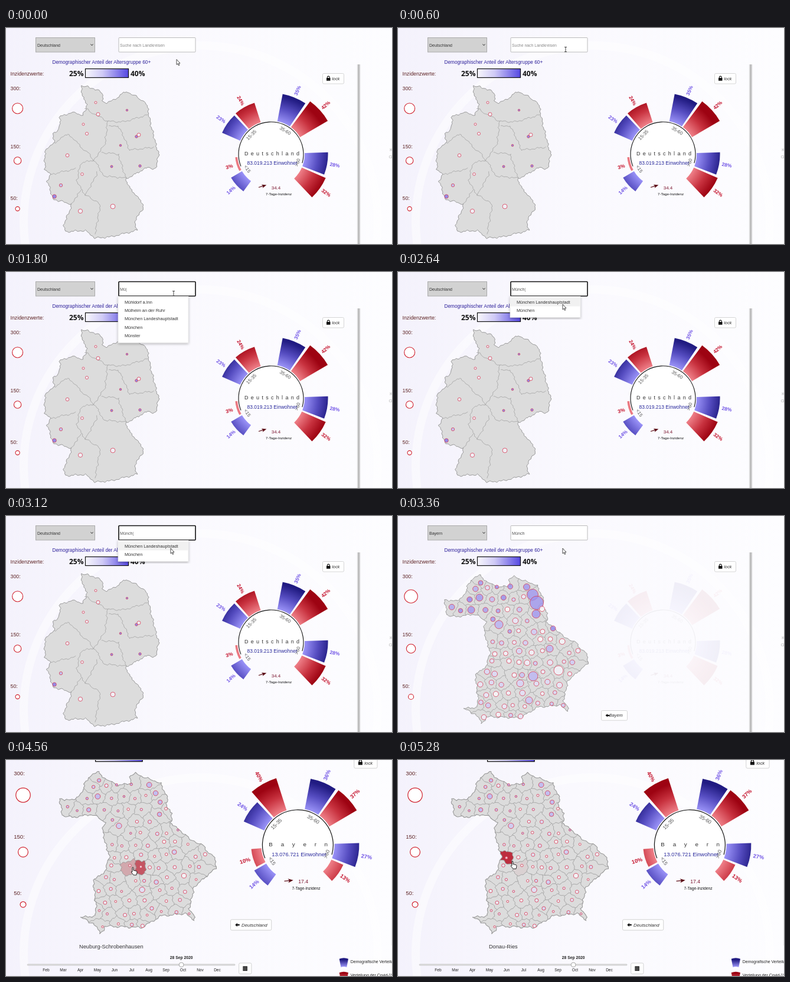
These frames come from a looping animation (654 by 368 pixels, 5400 ms). An HTML page:

```html
<!DOCTYPE html>
<html lang="de">
<head>
<meta charset="utf-8">
<style>
html, body { margin: 0; width: 100%; height: 100%; overflow: hidden; background: #fbfaff; }
svg { display: block; width: 100vw; height: 100vh; font-family: Arial, "Liberation Sans", sans-serif; }
</style>
</head>
<body>
<svg id="stage" viewBox="0 0 654 368"></svg>
<script>
const LOOP = 5400, STEP = 120, SWITCH = 3240, ZOOM = 3600;
const CX = 449, CY = 215, RING = 55;

const points = s => s.trim().split(/\s+/).map(p => p.split(',').map(Number));
const clamp = v => Math.max(0, Math.min(1, v));
const hash = i => { const v = Math.sin(i * 127.1 + 3) * 43758.5; return v - Math.floor(v); };
const text = (x, y, s, size, fill = '#333', extra = '') =>
  `<text x="${x}" y="${y}" font-size="${size}" fill="${fill}" ${extra}>${s}</text>`;
const rect = (x, y, w, h, fill, stroke = 'none', extra = '') =>
  `<rect x="${x}" y="${y}" width="${w}" height="${h}" fill="${fill}" stroke="${stroke}" ${extra}/>`;
const path = (d, fill = 'none', stroke = 'none', extra = '') =>
  `<path d="${d}" fill="${fill}" stroke="${stroke}" ${extra}/>`;
const button = (x, y, w, h) => rect(x, y, w, h, '#fff', '#ccc', 'rx="2" stroke-width=".8"');
const MID = 'text-anchor="middle"', ITALIC = 'font-style="italic"', BOLD = ' font-weight="bold"';

// ---- maps ----
const germany = points(`127,98 147,103 164,110 163,124 172,128 205,108 238,128 244,158 250,182 259,218 253,240
  241,238 203,256 208,270 234,302 218,330 222,344 178,356 152,358 133,345 100,347 98,335 112,300 80,292 70,262
  75,250 66,240 66,210 82,195 80,180 92,168 91,152 112,144 131,148 138,130 131,120`);
const stateBorders = ['133,137 172,159 198,160 240,148', '172,159 168,196 150,225', '176,168 190,166 210,208 252,203',
  '162,212 190,215 203,256 165,252 150,225', '82,196 105,180 150,225 126,230 120,262 135,285 155,246',
  '75,250 118,240', '112,300 127,275', '135,285 160,300 151,351'].map(points);
// x, y, radius
const cities = points(`152,127,2 156,147,3 205,140,1.7 131,164,2 137,180,2.5 221,185,2.3 225,182,3 194,200,1.8
  104,217,2.8 129,249,2.3 179,236,2 227,235,2.2 93,268,2.7 82,287,3.3 126,312,3.6 181,304,4`);
const bavaria = points(`79,143 100,145 118,128 116,120 130,104 139,101 152,113 170,122 190,118 189,108 196,103
  235,118 247,143 244,155 254,165 251,180 281,205 304,218 322,240 321,252 288,280 280,316 288,322 287,333 274,322
  235,326 208,344 150,342 142,353 132,338 110,328 134,326 136,316 131,270 148,258 156,235 145,190 150,180 130,167
  98,172 83,168`);
// x, y, first radius
const largest = points(`140,114,4 228,134,9.5 235,148,11.5 218,121,5.5 234,167,7 171,185,7 272,263,8 229,273,8
  257,226,6 207,285,6 124,160,6 138,139,6 222,314,6`);
// site x, y, enter, leave, name
const hovers = [
  [197, 271, 3200, 4000, 'Dachau'], [205, 249, 4000, 4450, 'Pfaffenhofen a.d.Ilm'],
  [188, 247, 4450, 4900, 'Neuburg-Schrobenhausen'], [164, 235, 4900, 9999, 'Donau-Ries']];

const inside = (x, y) => bavaria.reduce((odd, [ax, ay], i) => {
  const [bx, by] = bavaria[(i + 1) % bavaria.length];
  return (ay > y) !== (by > y) && x < ax + (bx - ax) * (y - ay) / (by - ay) ? !odd : odd;
}, false);

const sites = [...largest.map(([x, y, r], i) => [x, y, r, 2.4 + hash(i) * 2, y < 170 ? .6 : hash(i + 9) * .45]),
  ...hovers.map(([x, y]) => [x, y, 4, 2, .05])];
for (let row = 0; row < 14; row++) for (let col = 0; col < 14; col++) {
  const n = row * 14 + col;
  const x = 72 + col * 20 + row % 2 * 10 + hash(n) * 10, y = 101 + row * 18 + hash(n + 300) * 8;
  if (inside(x, y) && sites.every(s => Math.hypot(s[0] - x, s[1] - y) > 12))
    sites.push([x, y, 3 + hash(n + 500) * 2, 1.6 + hash(n + 700) * 1.2, hash(n + 900) * (y < 200 ? .7 : .35)]);
}

// Subdivides a line and bends it with position-based waves, so shared borders still meet.
function rough(line, closed) {
  const out = [], n = line.length;
  for (let i = 0; i < (closed ? n : n - 1); i++) {
    const [ax, ay] = line[i], [bx, by] = line[(i + 1) % n];
    const parts = Math.ceil(Math.hypot(bx - ax, by - ay) / 2.5);
    for (let k = 0; k <= parts; k++) {
      const x = ax + (bx - ax) * k / parts, y = ay + (by - ay) * k / parts;
      out.push((x + Math.sin(y * .8 + x * .3) * .9 + Math.sin(y * .33)).toFixed(1) + ' ' +
               (y + Math.sin(x * .75 - y * .35) * .9 + Math.sin(x * .31)).toFixed(1));
    }
  }
  return 'M' + out.join('L') + (closed ? 'Z' : '');
}

// Keeps the part of a polygon that is nearer to a than to b.
function cut(poly, a, b) {
  const side = p => (p[0] - (a[0] + b[0]) / 2) * (b[0] - a[0]) + (p[1] - (a[1] + b[1]) / 2) * (b[1] - a[1]);
  return poly.flatMap((p, i) => {
    const q = poly[(i + 1) % poly.length], sp = side(p), sq = side(q), out = sp <= 0 ? [p] : [];
    if (sp * sq < 0) out.push([0, 1].map(k => p[k] + (q[k] - p[k]) * sp / (sp - sq)));
    return out;
  });
}
const frame = [[60, 80], [340, 80], [340, 370], [60, 370]];
const cells = sites.map(a => rough(sites.reduce((poly, b) => b === a ? poly : cut(poly, a, b), frame), true));

const dot = (x, y, r, s) => `<circle cx="${x}" cy="${y}" r="${r}" fill="rgb(${255 - 165 * s},${255 - 180 * s},${255 - 25 * s})"
  fill-opacity=".75" stroke="#d8405a" stroke-width=".8"/>`;
const bavariaOutline = rough(bavaria, true);
const germanyMap = path(rough(germany, true), '#dcdcdc', '#999') +
  stateBorders.map(b => path(rough(b), 'none', '#a2a2a2', 'stroke-width=".8"')).join('') +
  cities.map(([x, y, r]) => dot(x, y, r, x > 175 && r < 2.5 || x < 85 ? .8 : x < 95 ? .4 : .05)).join('');
const districts = cells.map(d => path(d, '#dcdcdc', '#a2a2a2', 'stroke-width=".7"')).join('');

function bavariaMap(t) {
  const late = t >= ZOOM;
  const red = late ? hovers.map(([, , on, off], i) => {
    const alpha = clamp(Math.min((t - on) / 400, 1 - (t - off) / 400));
    return path(cells[largest.length + i], '#bb2335', '#999', `opacity="${alpha}" stroke-width=".7"`);
  }).join('') : '';
  return `<g clip-path="url(#land)">${districts}${red}</g>` + path(bavariaOutline, 'none', '#999') +
    sites.map(([x, y, early, small, s]) => dot(x, y, late ? small : early, late ? s * .7 : s)).join('');
}

// ---- ring chart ----
const polar = (r, deg) => {
  const a = deg * Math.PI / 180;
  return [CX + r * Math.cos(a), CY + r * Math.sin(a)].map(v => v.toFixed(2));
};
const arc = (r, a, b, sweep) => `A${r} ${r} 0 ${Math.abs(b - a) > 180 ? 1 : 0} ${sweep} ${polar(r, b)}`;
const wedge = (r, a, b) => `M${polar(RING + 2, a)}L${polar(r, a)}${arc(r, a, b, 1)}L${polar(RING + 2, b)}${arc(RING + 2, b, a, 0)}Z`;
const radial = (s, r, a, size, fill, turn, extra = '') =>
  `<g transform="translate(${polar(r, a)}) rotate(${turn})">${text(0, size * .36, s, size, fill, MID + extra)}</g>`;

function chart({ name, gap, people, rate, tilt, share }, opacity) {
  let s = path(`M${polar(RING, 158)}${arc(RING, 158, 376, 1)}`, '#fff', '#111', 'stroke-width="1.1"');
  share.forEach((p, i) => {
    const a = 126.5 + 77.2 * (i >> 1) + 25.5 * (i % 2), mid = a + 11.5, r = Math.sqrt(RING * RING + 225 * p);
    s += path(wedge(r, a, a + 23), i % 2 ? 'url(#red)' : 'url(#blue)');
    s += radial(p + '%', r + 13, mid, 8.5, i % 2 ? '#c4122c' : '#7256e6', i < 4 ? mid - 180 : mid, BOLD);
  });
  ['&lt;15', '15-35', '35-60', '&gt;60'].forEach((label, i) => {
    const a = 148 + 76.5 * i;
    s += radial(label, 47, a, 8, '#555', i % 3 ? a + 90 : a - 90);
  });
  s += text(404, 217, name, 9, '#333', `letter-spacing="${gap}"`) + text(451, 232.5, people + ' Einwohner', 8.5, '#28289c', MID);
  s += `<g transform="translate(428 271.5) rotate(${tilt})">${path('M0 0H9', 'none', '#5a0a14', 'stroke-width="1.2"')}${path('M6 -3.2L14 0 6 3.2 8 0Z', '#5a0a14')}</g>`;
  s += text(457.5, 275, rate, 8, '#7c1730', MID) + text(462, 285, '7-Tage-Inzidenz', 6.2, '#111', MID);
  return `<g opacity="${opacity}">${s}</g>`;
}
const country = { name: 'Deutschland', gap: 4.3, people: '83.019.213', rate: '34.4', tilt: -17, share: [14, 3, 23, 24, 35, 42, 28, 32] };
const region = { name: 'Bayern', gap: 12.6, people: '13.076.721', rate: '17.4', tilt: -6, share: [14, 10, 24, 40, 36, 37, 27, 13] };

// ---- search ----
const both = ['München Landeshauptstadt', 'München'];
const all = ['Altmarkkreis Salzwedel', 'Alzey-Worms', 'Amberg', 'Amberg-Sulzbach', 'Ammerland', 'Bad Dürkheim', 'Bamberg',
  'Barnim', 'Berlin-Charlottenburg-Wilmersdorf', 'Berlin-Marzahn-Hellersdorf', 'Berlin-Mitte',
  'Berlin-Tempelhof-Schöneberg', 'Bochum', 'Bremen', 'Bremerhaven'];
const results = [all, ['Mühldorf a.Inn', 'Mülheim an der Ruhr', ...both, 'Münster'], [...both, 'Münster'], both, both];

function search(t) {
  const focus = t >= 720 && t < SWITCH;
  const count = t < 1200 ? 0 : t < 1680 ? 1 : Math.min(5, 2 + Math.floor((t - 1680) / 240));
  let s = rect(191, 16.5, 130, 24.5, '#fff', focus ? '#111' : '#bbb', `rx="1" stroke-width="${focus ? 1.6 : 1}"`);
  if (!count) return s + text(193, 31.5, 'Suche nach Landkreisen', 6.9, '#888');
  s += text(193, 31.5, 'Münch'.slice(0, count) + (focus ? '<tspan fill="#777">|</tspan>' : ''), 7.2, '#555');
  if (!focus) return s;
  const items = results[count - 1], long = items === all, w = long ? 169 : 119, h = long ? 222 : items.length * 14.45 + 7;
  s += rect(190, 41.5, w, h, '#fff', '#ddd', 'stroke-width=".6" filter="url(#shade)"');
  if (t >= 2520) s += rect(190.5, 44, w - 1, 14.5, '#f1f1f1');
  items.forEach((item, i) => s += text(201, 53.5 + 14.45 * i, item, 7.35));
  if (long) s += rect(350.5, 42, 8, 221, '#f2f2f2') + rect(351, 50, 7, 24, '#c1c1c1') +
    path('M352.5 47.5l2 -2.5 2 2.5zM352.5 258l2 2.5 2 -2.5z', '#666');
  return s;
}

// ---- page ----
function page(t) {
  const inRegion = t >= SWITCH, zoomed = t >= ZOOM;
  let s = rect(596, 62, 3.2, 310, '#aaa', 'none', 'filter="url(#soft)"') + text(650, 210, 'K', 8, '#bbb') + text(648.5, 222, 'G', 8, '#bbb');
  s += rect(50.5, 16.5, 100, 24.5, '#d2d2d2', '#aaa') + text(53, 31.5, inRegion ? 'Bayern' : 'Deutschland', 7) +
    path('M143.5 27.5l2 2.3 2 -2.3', 'none', '#222');
  s += text(78.5, 61, 'Demographischer Anteil der Altersgruppe 60+', 8.25, '#2c1f9a');
  for (const [x, label] of [[107, '25%'], [211, '40%']])
    s += text(x, 81.5, label, 12, '#111', 'font-family="Noto Sans, sans-serif"' + BOLD);
  s += rect(134.5, 69.5, 73, 15, 'url(#scale)', '#111', 'stroke-width="1.2"');
  s += text(7.5, 80.5, 'Inzidenzwerte:', 8.8, '#5e2424');
  [[106, 300, 137, 9], [205, 150, 226, 6.2], [293, 50, 308, 3.6]].forEach(([y, label, cy, r]) =>
    s += text(7.5, y, label + ':', 8.8, '#5e2424') + `<circle cx="${inRegion ? 22 : 19.6}" cy="${cy}"
      r="${inRegion ? r * 1.25 : r}" fill="#fff" stroke="#d0222e" stroke-width="1.1"/>`);
  s += button(536.5, 77.5, 36, 17.5) + rect(543, 85, 6.5, 4.8, '#111') +
    path('M544.4 85.5V84a1.9 1.9 0 0 1 3.8 0V85.5', 'none', '#111', 'stroke-width="1.1"') + text(552.5, 89, 'lock', 7.3, '#333', ITALIC);
  s += inRegion ? bavariaMap(t) : germanyMap;
  if (t < 3480) s += chart(country, t < SWITCH ? 1 : t < 3360 ? .4 : .05);
  else s += chart(region, zoomed ? 1 : .5);
  if (inRegion) s += button(344.5, 331.5, zoomed ? 63.5 : 44, 16.7) + path('M351.5 339.8l3.6-2.8v1.7h3.4v2.2h-3.4v1.7z', '#111') +
    text(zoomed ? 361.5 : 358, 342.3, zoomed ? 'Deutschland' : 'Bayern', 7.2, '#333', ITALIC);
  return s + search(t) + (zoomed ? footer(t) : '');
}

function footer(t) {
  let s = text(159, 376.8, hovers.find(h => t < h[3])[4], 8.5, '#333', MID);
  s += rect(28.5, 401.2, 323, 2, '#ddd', '#bbb', 'rx="1" stroke-width=".5"') +
    '<circle cx="268" cy="402.2" r="3.6" fill="#fff" stroke="#999" stroke-width=".8"/>' + text(268, 392.8, '28 Sep 2020', 6.2, '#222', MID + BOLD);
  'Feb Mar Apr May Jun Jul Aug Sep Oct Nov Dec'.split(' ').forEach((m, i) => s += text(57.8 + 26.6 * i, 412.8, m, 6, '#222', MID));
  s += button(357.5, 399.5, 19.5, 17) + rect(363.6, 404.5, 7, 7.2, '#222') +
    path('M364 407h6m-6 2.4h6', 'none', '#fff', 'stroke-width=".4"');
  [['blue', 392, 'Demografische Verteilung'], ['red', 413.5, 'Verteilung der Covid-19-Fälle']].forEach(([c, y, label]) =>
    s += path(`M513.5 ${y + 1}q7 -3 14 0l-2.5 13q-4.5 -2 -9 0z`, `url(#${c}Key)`) + text(531, y + 7.2, label, 6.4, '#222'));
  return s;
}

// ---- pointer: time, x, y ----
const track = [[0, 289, 53.5], [120, 289, 53.5], [600, 284, 36.5], [2160, 284, 36.5], [2520, 279, 55], [3599, 279, 55],
  [3600, 222, 203], [3720, 222, 203], [4080, 226, 188], [4560, 212, 182], [5280, 191, 171.5]];
function pointer(t) {
  const i = Math.max(1, track.findIndex(k => k[0] >= t)), a = track[i - 1], b = track[i], f = (t - a[0]) / (b[0] - a[0]);
  const [x, y] = [1, 2].map(k => a[k] + (b[k] - a[k]) * f);
  const shape = t >= ZOOM
    ? path('M2 1.2q1.2 -1 2 .3V6l5 1.2q1.2.4 1 2L9 14H4L.2 9q.2 -1.4 1.8 -.4Z', '#fff', '#111', 'stroke-width=".9"')
    : y < 41 ? path('M-2 -4H2M0 -4V4M-2 4H2', 'none', '#333', 'stroke-width=".9"')
    : path('M0 0V9L2 7.2 3.4 10.4 4.8 9.8 3.4 6.6H6Z', '#fff', '#222', 'stroke-width=".8"');
  return `<g transform="translate(${x} ${y})">${shape}</g>`;
}

// ---- defs and loop ----
const stops = list => list.map(([o, c]) => `<stop offset="${o}" stop-color="${c}"/>`).join('');
const ringFill = (id, a, b, c) =>
  `<radialGradient id="${id}" gradientUnits="userSpaceOnUse" cx="${CX}" cy="${CY}" r="108">${stops([[.5, a], [.74, b], [.93, c]])}</radialGradient>
   <linearGradient id="${id}Key" x2="0" y2="0" y1="1">${stops([[0, a], [.8, c]])}</linearGradient>`;
const defs = `<defs>
  ${ringFill('blue', '#a39cff', '#554cc0', '#211b82')}${ringFill('red', '#f48a92', '#c8323f', '#9d0312')}
  <linearGradient id="scale">${stops([[0, '#f8f7fc'], [.4, '#cfcaf6'], [1, '#5548e2']])}</linearGradient>
  <linearGradient id="back">${stops([[0, '#f4f2fc'], [.45, '#faf9fe'], [1, '#fdfdff']])}</linearGradient>
  <clipPath id="land"><path d="${bavariaOutline}"/></clipPath>
  <filter id="soft" x="-200%" width="500%"><feGaussianBlur stdDeviation=".9 .4"/></filter>
  <filter id="shade"><feDropShadow dx="0" dy="1.5" stdDeviation="2" flood-opacity=".3"/></filter>
</defs>`;
const backdrop = rect(0, 0, 654, 368, 'url(#back)') +
  '<circle cx="330" cy="330" r="300" fill="none" stroke="#fff" stroke-width="14" opacity=".5"/>';

const stage = document.getElementById('stage');
let shown = -1;
function tick(now) {
  const t = Math.floor(now % LOOP / STEP) * STEP;
  if (t !== shown) {
    shown = t;
    const view = t >= ZOOM ? 'translate(5 -89.5) scale(1.09)' : '';
    stage.innerHTML = `${defs}${backdrop}<g transform="${view}">${page(t)}</g>${pointer(t)}`;
  }
  requestAnimationFrame(tick);
}
tick(performance.now());
</script>
</body>
</html>
```
